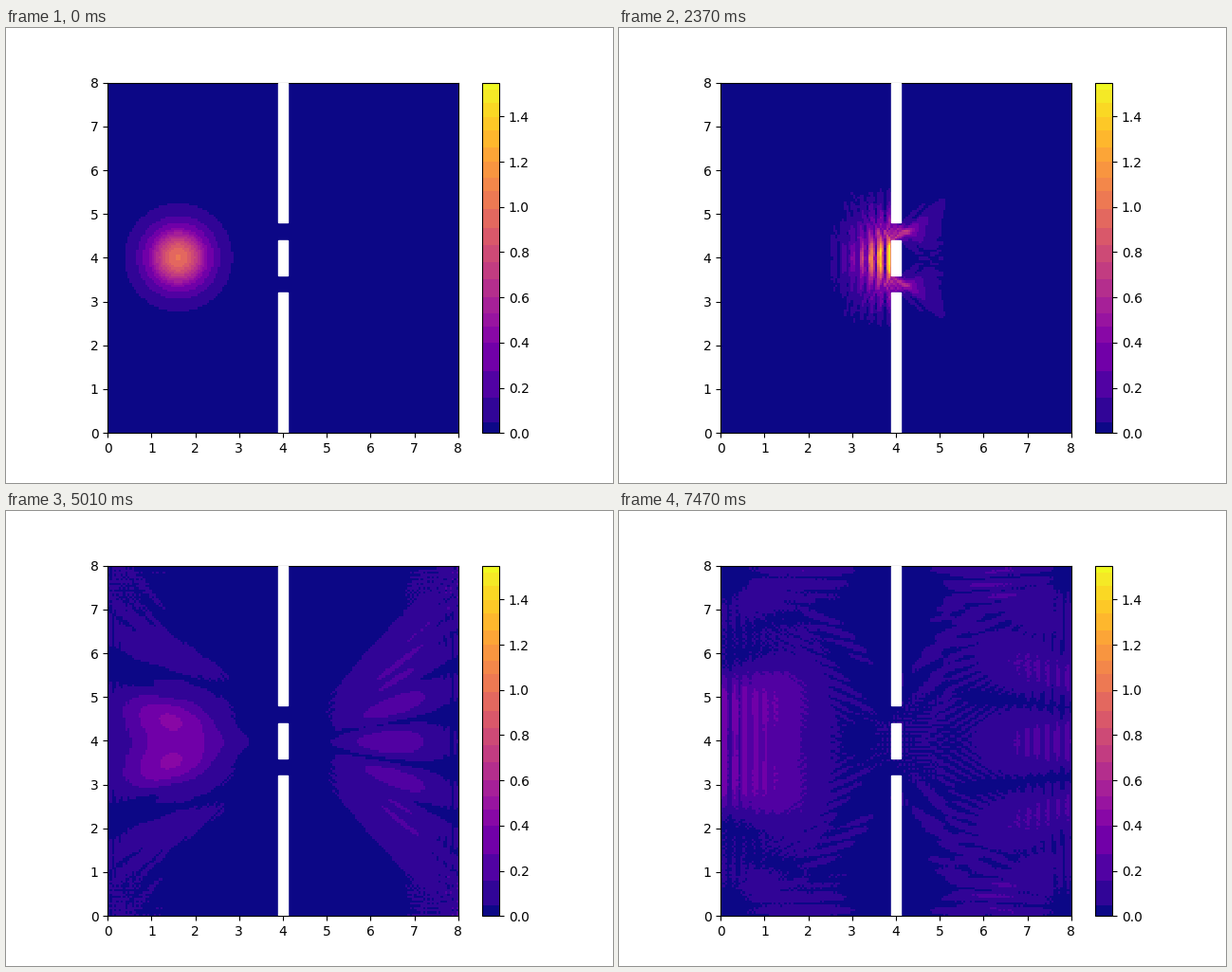
A matplotlib script that plays this animation: 640x480 px, repeating every 7500 ms.

```python
import numpy as np
import matplotlib.pyplot as plt
from matplotlib.animation import FuncAnimation
from matplotlib.colors import ListedColormap
from matplotlib.patches import Rectangle

L, D = 8, 0.05                # box side, grid step
N = int(L / D) - 1            # interior points per side
FRAMES, STEPS = 250, 2        # frames, time steps per frame

# Double slit: wall thickness, slit separation, slit aperture
w, s, a = 0.2, 0.8, 0.4
j0, j1 = round((L - w) / 2 / D), round((L + w) / 2 / D)
i0, i1 = round(((L + s) / 2 + a) / D), round((L + s) / 2 / D)
i2, i3 = round((L - s) / 2 / D), round(((L - s) / 2 - a) / D)


def block(psi):
    for rows in (slice(0, i3), slice(i2, i1), slice(i0, None)):
        psi[rows, j0:j1] = 0
    return psi


def packet(x0=L / 5, y0=L / 2, sigma=0.5, k=15 * np.pi):
    x, y = np.meshgrid(np.linspace(0, L, N), np.linspace(0, L, N))
    r2 = (x - x0) ** 2 + (y - y0) ** 2
    psi = np.exp(-r2 / (2 * sigma ** 2)) * np.exp(1j * k * (x - x0))
    psi[[0, -1], :] = 0
    psi[:, [0, -1]] = 0
    return block(psi)


def simulate():
    """Crank-Nicolson steps, solved exactly in the sine basis."""
    n = np.arange(1, N + 1)
    S = np.sqrt(2 / (N + 1)) * np.sin(np.pi * np.outer(n, n) / (N + 1))
    S = S.astype(complex)
    lam = 2 - 2 * np.cos(np.pi * n / (N + 1))
    r = 1j / 8 * (lam[:, None] + lam[None, :])   # dt = D**2 / 4
    G = (1 - r) / (1 + r)
    psi, mods = packet(), []
    for _ in range(FRAMES * STEPS):
        mods.append(np.abs(psi))
        psi = block(S @ (G * (S @ psi @ S)) @ S)
    return mods


def banded_plasma(top):
    edges = np.array([0, .045, .155, .27, .4, .47, .53, .6, .68, .755, .83,
                      .91, .99, 1.07, 1.13, 1.2, 1.265, 1.34, 1.4, 1.46,
                      1.52, 1.6]) / top
    mids = (edges[:-1] + edges[1:]) / 2
    mids[0] = 0
    band = np.digitize(np.linspace(0, 1, 512), edges) - 1
    return ListedColormap(plt.get_cmap("plasma")(mids[band.clip(0, len(mids) - 1)]))


mods = simulate()
top = np.max(mods)

fig = plt.figure(figsize=(6.4, 4.8), dpi=100)
ax = fig.add_subplot(111, xlim=(0, L), ylim=(0, L))
img = ax.imshow(mods[0], extent=[0, L, 0, L], cmap=banded_plasma(top),
                vmin=0, vmax=top, zorder=1, interpolation="none")
fig.colorbar(img, ax=ax)

for lo, hi in ((0, i3), (i2, i1), (i0, L / D)):
    ax.add_patch(Rectangle((j0 * D, lo * D), w, (hi - lo) * D,
                           color="w", zorder=50))


def update(i):
    img.set_data(mods[i * STEPS])
    return img,


anim = FuncAnimation(fig, update, frames=FRAMES, interval=30, repeat=True)
plt.show()
```
